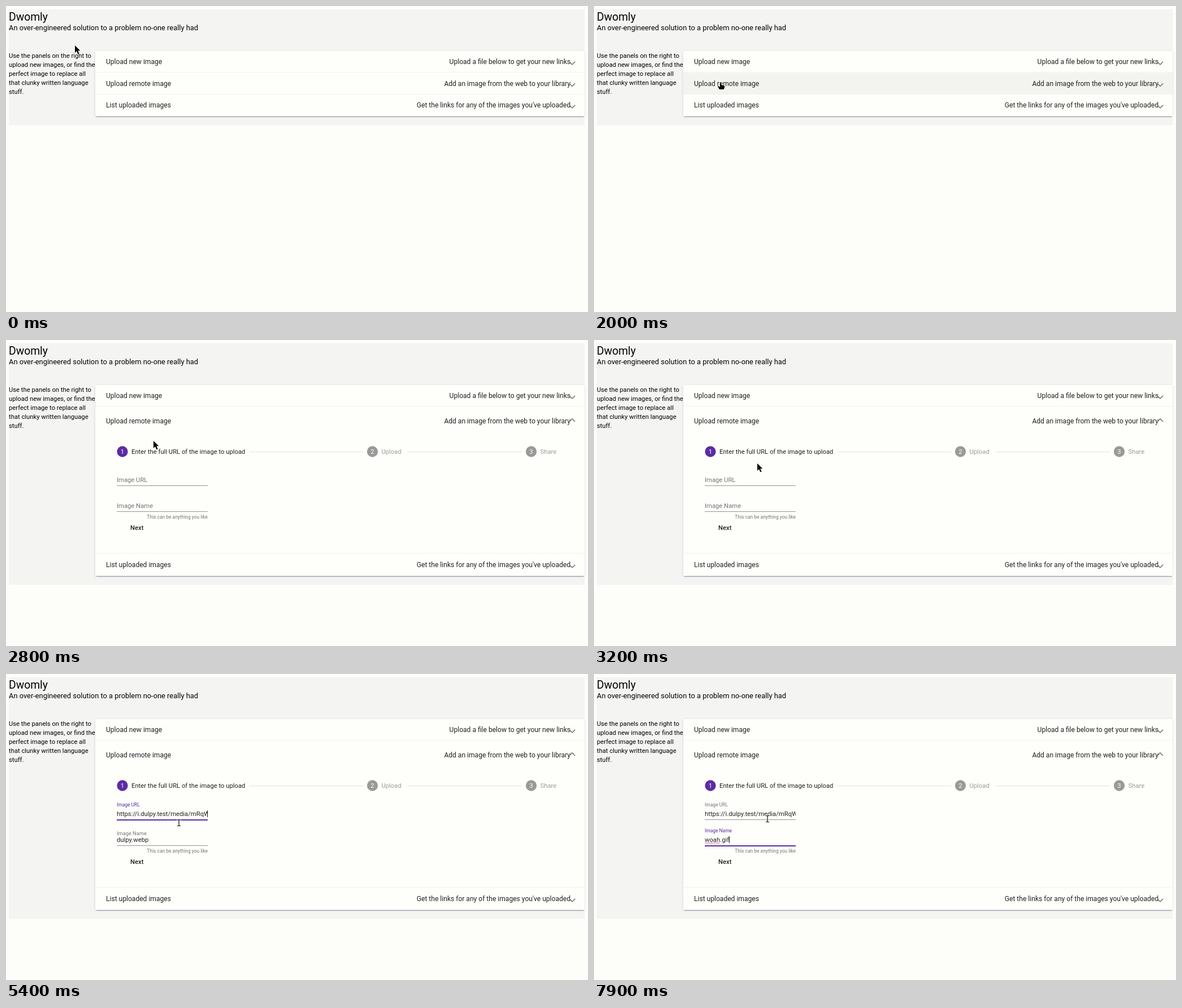
An HTML page with a canvas that plays this animation: 1030 px wide and 543 px high, repeating every 8 s.

```html
<!DOCTYPE html>
<html lang="en">
<head>
<meta charset="utf-8">
<title>Image library</title>
<style>
html, body { margin: 0; width: 100%; height: 100%; overflow: hidden; background: #fdfdf9; }
canvas { display: block; }
</style>
</head>
<body>
<canvas id="stage" width="1030" height="543"></canvas>
<script>
const ctx = document.getElementById('stage').getContext('2d');
const LOOP = 8000, STEP = 100;
const ZOOM = 1030 / 1280;
const PURPLE = '#5b2ca3', INK = '#212121', GREY = '#757575', FAINT = '#9c9c9c';
const PANEL = { x: 158, y: 80, w: 866, row: 38.5 };
const FIELD = { x: 196, w: 161 };
const OPEN_AT = 2294, URL_FOCUS = 4000, PASTE = 5300, NAME_FOCUS = 5800;
const LINK = 'https://i.dulpy.test/media/mRqW';
const FILE = 'dulpy.webp';
const TYPED = 'woah.gif';
// [time, visible characters]
const KEYS = [[7100, 1], [7300, 2], [7400, 3], [7500, 4], [7600, 6], [7800, 7], [7900, 8]];
// [time, x, y]
const POINTER = [
  [0, 122, 70], [600, 122, 70], [1500, 196, 117], [2250, 236, 144], [2450, 236, 144],
  [3200, 289, 219], [3900, 306, 264], [5900, 306, 264], [6000, 306, 261],
  [7000, 306, 261], [7100, 307, 257]
];

const clamp = v => Math.min(1, Math.max(0, v));
const mix = (a, b, k) => a + (b - a) * k;

function bezier(x1, y1, x2, y2, x) {
  const at = (a, b, u) => 3 * u * (1 - u) * (1 - u) * a + 3 * u * u * (1 - u) * b + u * u * u;
  let lo = 0, hi = 1;
  for (let i = 0; i < 24; i++) {
    const mid = (lo + hi) / 2;
    if (at(x1, x2, mid) < x) lo = mid; else hi = mid;
  }
  return at(y1, y2, lo);
}

function text(str, x, y, size, color = INK, align = 'left', weight = 400) {
  ctx.font = `${weight} ${size * ZOOM}px Roboto, sans-serif`;
  ctx.fillStyle = color;
  ctx.textAlign = align;
  ctx.fillText(str, x, y);
}

function box(x, y, w, h, color) {
  ctx.fillStyle = color;
  ctx.fillRect(x, y, w, h);
}

function shadowBox(x, y, w, h, dy, blur, alpha) {
  ctx.save();
  ctx.shadowColor = `rgba(20,20,60,${alpha})`;
  ctx.shadowOffsetY = dy;
  ctx.shadowBlur = blur;
  box(x, y, w, h, '#fefefb');
  ctx.restore();
}

function polygon(points) {
  ctx.beginPath();
  points.forEach(([x, y]) => ctx.lineTo(x, y));
  ctx.closePath();
}

function page(bottom) {
  box(0, 0, 1030, 543, '#fdfdf9');
  box(5, 6, 1019, bottom + 16 - 6, '#f4f5f2');
  text('Dwomly', 5, 26, 24, '#000');
  text('An over-engineered solution to a problem no-one really had', 5, 43, 16, '#000');
  ['Use the panels on the right to', 'upload new images, or find the',
    'perfect image to replace all', 'that clunky written language', 'stuff.']
    .forEach((line, i) => text(line, 5, 92 + 16 * i, 14, '#000'));
}

function chevron(y, turn) {
  const r = 3.2;
  ctx.save();
  ctx.translate(1002, y);
  ctx.rotate(Math.PI * (0.25 + turn));
  ctx.strokeStyle = '#777';
  ctx.lineWidth = 1.6;
  ctx.beginPath();
  ctx.moveTo(r, -r - 0.8);
  ctx.lineTo(r, r);
  ctx.lineTo(-r - 0.8, r);
  ctx.stroke();
  ctx.restore();
}

function header(title, note, top, height, turn, hover) {
  const mid = top + height / 2;
  if (hover) box(PANEL.x, top, PANEL.w, height, '#f3f3f0');
  text(title, 177, Math.round(mid + 3.9), 15);
  text(note, 999, Math.round(mid + 3.9), 15, INK, 'right');
  chevron(mid + 0.2, turn);
}

function step(n, label, x, y, active) {
  ctx.fillStyle = active ? PURPLE : '#999998';
  ctx.beginPath();
  ctx.arc(x, y, 12 * ZOOM, 0, 7);
  ctx.fill();
  text(n, x, y + 4, 14, '#fff', 'center');
  text(label, x + 16, y + 4, 14, active ? INK : FAINT);
}

function field(label, y, lift, focus) {
  const color = focus > 0 ? PURPLE : GREY;
  text(label, FIELD.x, mix(y, y - 17, lift), mix(14, 10.5, lift), color);
  box(FIELD.x, y + 6, FIELD.w, 1, '#949494');
  if (focus > 0) {
    const w = FIELD.w * mix(0.5, 1, focus);
    ctx.globalAlpha = focus;
    box(FIELD.x + (FIELD.w - w) / 2, y + 6, w, 2, PURPLE);
    ctx.globalAlpha = 1;
  }
}

function caret(x, y, since) {
  if (since % 1000 < 500) box(Math.round(x), y - 10, 1, 12, '#111');
}

function nameValue(t, y) {
  const count = KEYS.reduce((n, [at, c]) => t >= at ? c : n, 0);
  const value = count ? TYPED.slice(0, count) : FILE;
  ctx.font = `400 ${14 * ZOOM}px Roboto, sans-serif`;
  const width = ctx.measureText(value).width;
  const selected = !count && t >= NAME_FOCUS;
  if (selected) box(FIELD.x, y - 10, width, 12, '#4682c8');
  text(value, FIELD.x, y, 14, selected ? '#e4edf8' : INK);
  if (!count) return;
  caret(FIELD.x + width, y, 0);
  if (count > 4) {
    const end = FIELD.x + ctx.measureText('woah').width;
    ctx.strokeStyle = '#c44a4a';
    ctx.lineWidth = 0.8;
    ctx.beginPath();
    for (let x = FIELD.x; x <= end; x++) ctx.lineTo(x, y + 2 + 0.6 * Math.sin(x * 2));
    ctx.stroke();
  }
}

function form(t, top, bottom) {
  const y = d => Math.round(top + d);
  const lift = at => bezier(0.25, 0.8, 0.25, 1, clamp((t - at) / 400));
  const line = at => clamp((t - at) / 300);
  ctx.save();
  ctx.beginPath();
  ctx.rect(PANEL.x, top, PANEL.w, bottom - top);
  ctx.clip();

  const mid = y(28.6);
  step('1', 'Enter the full URL of the image to upload', 206, mid, true);
  step('2', 'Upload', 648.5, mid, false);
  step('3', 'Share', 929.5, mid, false);
  box(430.5, mid, 202, 1, '#e2e2e2');
  box(710.5, mid, 203, 1, '#e2e2e2');

  const urlY = y(82), nameY = y(128);
  const onUrl = t >= URL_FOCUS && t < NAME_FOCUS;
  field('Image URL', urlY, lift(URL_FOCUS), onUrl ? line(URL_FOCUS) : 0);
  if (t >= PASTE) {
    ctx.save();
    ctx.beginPath();
    ctx.rect(FIELD.x, urlY - 14, FIELD.w, 20);
    ctx.clip();
    text(LINK, FIELD.x, urlY, 14);
    ctx.restore();
  }
  if (onUrl) caret(t < PASTE ? FIELD.x : FIELD.x + FIELD.w - 1, urlY, t - (t < PASTE ? URL_FOCUS : PASTE));

  field('Image Name', nameY, lift(PASTE), line(NAME_FOCUS));
  if (t >= PASTE) nameValue(t, nameY);
  text('This can be anything you like', FIELD.x + FIELD.w, y(147), 10.5, GREY, 'right');
  text('Next', 220, y(167), 14, INK, 'left', 500);
  ctx.restore();
}

function pointerAt(t) {
  let i = 0;
  while (i < POINTER.length - 2 && t >= POINTER[i + 1][0]) i++;
  const [t0, x0, y0] = POINTER[i], [t1, x1, y1] = POINTER[i + 1];
  const k = clamp((t - t0) / (t1 - t0));
  return { x: Math.round(mix(x0, x1, k)), y: Math.round(mix(y0, y1, k)) };
}

const cursors = {
  arrow() {
    polygon([[0, 0], [0, 13], [3, 10], [5.4, 15.4], [7.6, 14.4], [5.3, 9.3], [9.3, 9.3]]);
  },
  hand() {
    polygon([[0, 1], [1, 0], [2, 1], [2, 5], [7, 6], [8, 7], [8, 10], [6.5, 13],
      [-1, 13], [-4, 8], [-3, 7], [0, 8.5]]);
  },
  beam() {
    polygon([[-3, -6], [3, -6], [3, -5], [0.6, -5], [0.6, 5], [3, 5], [3, 6],
      [-3, 6], [-3, 5], [-0.6, 5], [-0.6, -5], [-3, -5]]);
  }
};

function drawPointer(p, kind) {
  ctx.save();
  ctx.translate(p.x, p.y);
  cursors[kind]();
  ctx.lineJoin = 'round';
  ctx.lineWidth = 1.6;
  ctx.strokeStyle = 'rgba(255,255,255,.85)';
  ctx.stroke();
  ctx.fillStyle = '#000';
  ctx.fill();
  ctx.restore();
}

function draw(t) {
  const open = bezier(0.4, 0, 0.2, 1, clamp((t - OPEN_AT) / 225));
  const { x, y, w, row } = PANEL;
  const second = y + row;
  const head = row + 16 * ZOOM * open;
  const third = second + row + 223 * open;
  const bottom = third + row;
  const p = pointerAt(t);
  const inside = p.x >= x && p.y >= y;
  const onFirst = inside && p.y < second;
  const onSecond = inside && p.y >= second && p.y < second + head;

  page(bottom);
  const h = bottom - y;
  shadowBox(x, y, w, h, 0.8, 4, 0.12);
  shadowBox(x, y, w, h, 1.6, 1.6, 0.16);
  shadowBox(x + 1.6, y + 1.6, w - 3.2, h - 1.6, 1.4, 0.8, 0.25);
  box(x, y, w, h, '#fefefb');

  header('Upload new image', 'Upload a file below to get your new links', y, row, 0, onFirst);
  header('Upload remote image', 'Add an image from the web to your library',
    second, head, open, onSecond && open === 0);
  header('List uploaded images', "Get the links for any of the images you've uploaded", third, row, 0, false);
  if (open > 0) form(t, second + head, third);
  [second, third].forEach(line => box(x, Math.floor(line) - 1, w, 1, '#f1f1ec'));

  const kind = onFirst || onSecond ? 'hand' : inside && p.y > 232 ? 'beam' : 'arrow';
  drawPointer(p, kind);
}

const start = performance.now();
function tick() {
  const t = (performance.now() - start) % LOOP;
  draw(Math.floor(t / STEP) * STEP);
  requestAnimationFrame(tick);
}
tick();
</script>
</body>
</html>
```
